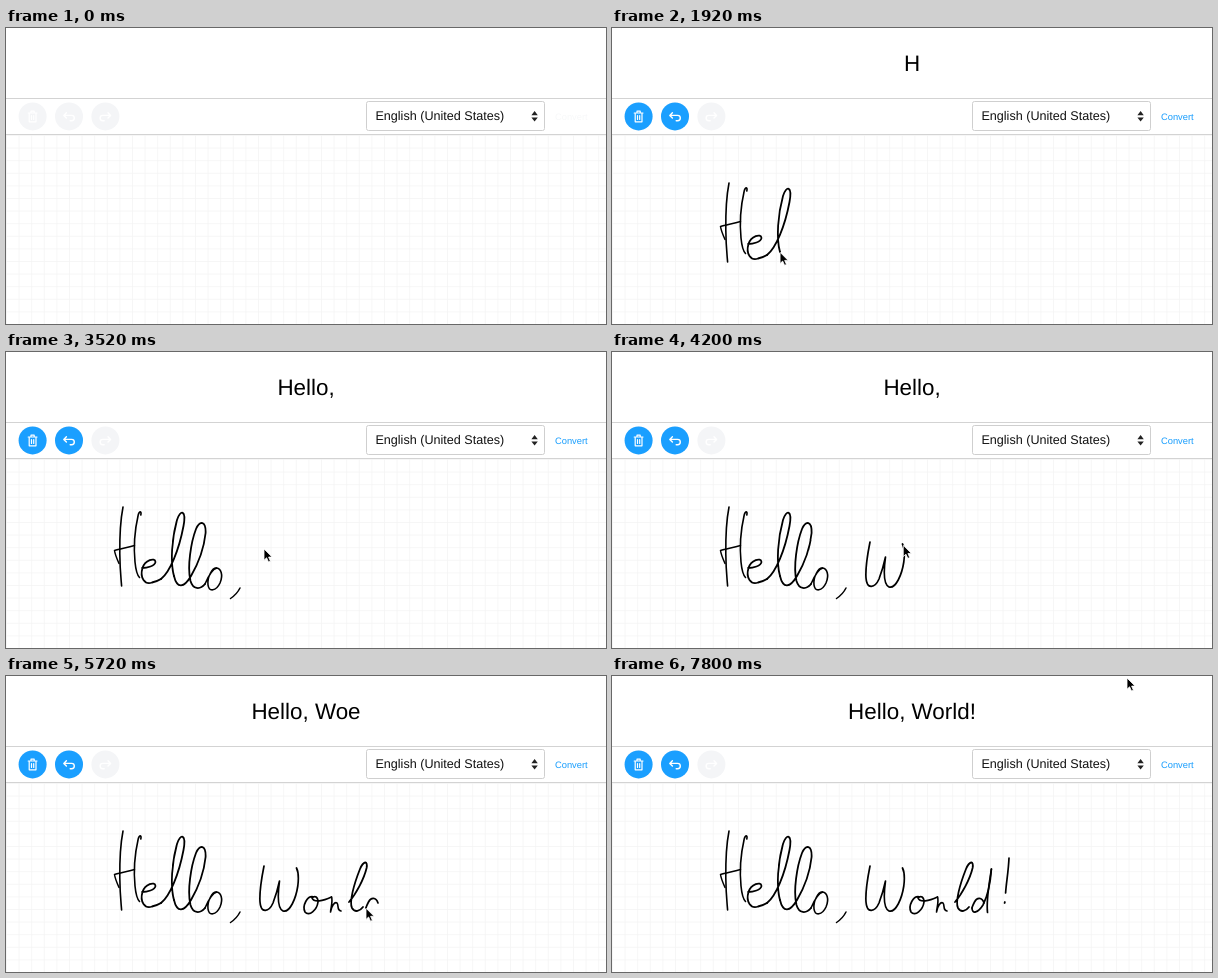
Animation of 600x296 px, one loop 8 s. Source, as an HTML page:

```html
<!DOCTYPE html>
<html lang="en">
<head>
<meta charset="utf-8">
<title>Handwriting to text</title>
<style>
  html, body { margin: 0; width: 100%; height: 100%; overflow: hidden; background: #fff; }
  svg { display: block; width: 100vw; height: 100vh; }
  text { font-family: "Liberation Sans", Arial, sans-serif; text-rendering: geometricPrecision; }
  .icon { fill: none; stroke: #fff; stroke-width: 1.4; stroke-linecap: round; stroke-linejoin: round; }
  #ink path { fill: none; stroke: #000; stroke-linecap: round; stroke-linejoin: round; }
</style>
</head>
<body>
<svg viewBox="0 0 600 296">
  <defs>
    <pattern id="grid" x="0" y="107" width="12.6" height="12.6" patternUnits="userSpaceOnUse">
      <path d="M0 .4H12.6M.4 0V12.6" stroke="#f3f3f3" stroke-width=".8"/>
    </pattern>
  </defs>
  <rect width="600" height="296" fill="#fff"/>
  <rect y="107" width="600" height="189" fill="url(#grid)"/>
  <path d="M0 70.5H600M0 106.5H600" stroke="#d3d3d3"/>

  <text id="result" x="300" y="43" font-size="22.4" text-anchor="middle"></text>

  <g fill="#f4f5f7">
    <circle cx="26.6" cy="88.4" r="14"/>
    <circle cx="63" cy="88.4" r="14"/>
    <circle cx="99.4" cy="88.4" r="14"/>
  </g>
  <text x="549" y="92" font-size="9.33" fill="#f7f8f9">Convert</text>
  <g id="active" fill="#1a9fff">
    <circle cx="26.6" cy="88.4" r="14"/>
    <circle cx="63" cy="88.4" r="14"/>
    <text x="549" y="92" font-size="9.33">Convert</text>
  </g>
  <g class="icon">
    <path d="M22.2 85H31M25 84.6V83.2H28.2V84.6M23.2 85.4V93.8H30V85.4M25.5 87.5V91.5M27.7 87.5V91.5" stroke-width="1.2"/>
    <path id="undo" d="M60.4 84.8L57.8 87.4L60.4 90M58 87.4H65.6A2.7 2.7 0 0 1 65.6 92.8H64.2"/>
    <use href="#undo" transform="matrix(-1 0 0 1 162.4 0)"/>
  </g>

  <rect x="360.5" y="73.5" width="178" height="29" rx="2" fill="#fff" stroke="#cfcfcf"/>
  <text x="369.4" y="92" font-size="12.6" fill="#111">English (United States)</text>
  <path d="M525.4 87.2L528.6 83L531.8 87.2ZM525.4 89.4H531.8L528.6 93.6Z" fill="#222"/>

  <g id="ink"></g>
  <path id="cursor" d="M0 0V11.2L2.6 8.8L4.5 13L6.4 12.2L4.6 8.1H8.1Z" fill="#000" stroke="#fff" stroke-width=".8" stroke-linejoin="round"/>
</svg>
<script>
const LOOP = 8000;

// Pen strokes: start ms, end ms, path, line width (0 = pen lifted)
const STROKES = [
  [40, 400, "M117 155C114.5 168 113.6 185 113.8 202S115 226 115.6 234", 1.6],
  [500, 800, "M113 211.5C111 207 109 202 108.5 198.5C114 197 121 195.5 128.5 193.5", 1.5],
  [900, 1160, "M134.8 163C135.8 159 133.4 158.6 132.2 163C129 177 127.5 195 129 210C129.8 218 131 223 133.5 225.5", 1.6],
  [1260, 1640, "M136 216C141 216 149 214 149.5 210C149 205 139 208 136.5 216C133.5 226 139 233 146 230.5C149 229.8 152 229 155 227", 1.8],
  [1640, 1920, "M155 227C164 220 173 198 177.5 174C180.5 158 174.5 157 171 168C166 186 164 210 168 224", 1.8],
  [1920, 2460, "M168 224C171 237 178 236 185 224C192 212 198 196 199.6 181C200 169 194 168 190 177C185 190 181 215 184.5 229C187 237.5 194 238 199 232", 1.8],
  [2560, 2900, "M199 232C202 225 206 217 211 216C206 215 201 226 202 233C203 240 210 239.5 214 231C217.5 223 215 216 210 216", 1.6],
  [3060, 3260, "M234 236C232 240 229 243.5 224.5 246.5", 1.5],
  [3520, 3530, "M258 197L258 196.5", 0],
  [3620, 4180, "M258 190C256 200 253.2 215 254 226C255 238 263 236 267 227C270 219 272 212 273.5 205C272 216 271 232 277 235C284 237 290 222 291.8 210C292.8 202 292 195 290.5 192", 1.7],
  [4340, 4840, "M308 221C301 219 296 230 299 236C303 241 311 234 312 226C312 221 309 219 306 222C308 227 317 225 325.5 221", 1.7],
  [4850, 5100, "M325.5 221C327 225 325 231 324.5 236C325.5 230 328.5 225.5 331 227C333 229 330.5 234 335 235", 1.6],
  [5180, 5540, "M343 226C350 218 358 203 360.6 192C362 184 357.4 185 354 193C348 208 343 226 346 232C349 237 354 235 357 231", 1.8],
  [5620, 5720, "M372 227C370 221 365 221 362.5 226C361 229 360 231 360 232", 1.7],
  [5720, 6000, "M360 232C360 238.5 366 237 371 229C376 219 378.6 205 379.4 193", 1.7],
  [6000, 6200, "M379.4 193C377.6 206 374 223 375.5 236.5", 1.7],
  [6360, 6600, "M397 182C396.4 196 394.2 207 393.6 217", 1.7],
  [6680, 6720, "M392.9 226L392.6 227", 1.8],
  [6800, 6980, "M391 235L393 234", 0],
  [6980, 7560, "M393 234C440 215 525 140 570 94", 0],
  [7560, 7760, "M570 94C560 70 527 32 512 8", 0],
  [7760, 7800, "M512 8L515 2", 0],
];

const TEXTS = [
  [0, ""], [1400, "H"], [3200, "Hello"], [3440, "Hello,"], [4600, "Hello, W"],
  [5400, "Hello, Woe"], [5800, "Hello, Work"], [6500, "Hello, World"], [7120, "Hello, World!"],
];
const ENABLE_AT = 1400, FADE = 200;

const $ = id => document.getElementById(id);
const clamp = v => Math.min(1, Math.max(0, v));
const ease = p => p * p * (3 - 2 * p);

const strokes = STROKES.map(([start, end, d, width]) => {
  const path = document.createElementNS("http://www.w3.org/2000/svg", "path");
  path.setAttribute("d", d);
  path.setAttribute("stroke-width", width);
  $("ink").append(path);
  const length = path.getTotalLength();
  path.setAttribute("stroke-dasharray", `${length} ${length + 10}`);
  return { start, end, path, length, width };
});

const pointOn = (s, p) => s.path.getPointAtLength(s.length * p);

function penAt(t) {
  const i = strokes.findLastIndex(s => s.start <= t);
  if (i < 0) return null;
  const s = strokes[i], next = strokes[i + 1];
  if (t <= s.end || !next) return pointOn(s, clamp((t - s.start) / (s.end - s.start)));
  const from = pointOn(s, 1), to = pointOn(next, 0);
  const p = ease((t - s.end) / (next.start - s.end));
  return { x: from.x + (to.x - from.x) * p, y: from.y + (to.y - from.y) * p };
}

function draw(t) {
  for (const s of strokes) {
    const p = clamp((t - s.start) / (s.end - s.start));
    s.path.style.display = p > 0 && s.width ? "" : "none";
    s.path.setAttribute("stroke-dashoffset", s.length * (1 - p));
  }
  const pen = penAt(t);
  $("cursor").style.display = pen ? "" : "none";
  if (pen) $("cursor").setAttribute("transform", `translate(${pen.x} ${pen.y})`);
  $("active").setAttribute("opacity", clamp((t - ENABLE_AT) / FADE));
  $("result").textContent = TEXTS.findLast(([at]) => at <= t)[1];
}

const began = performance.now();
function tick() {
  draw((performance.now() - began) % LOOP);
  requestAnimationFrame(tick);
}
tick();
</script>
</body>
</html>
```
